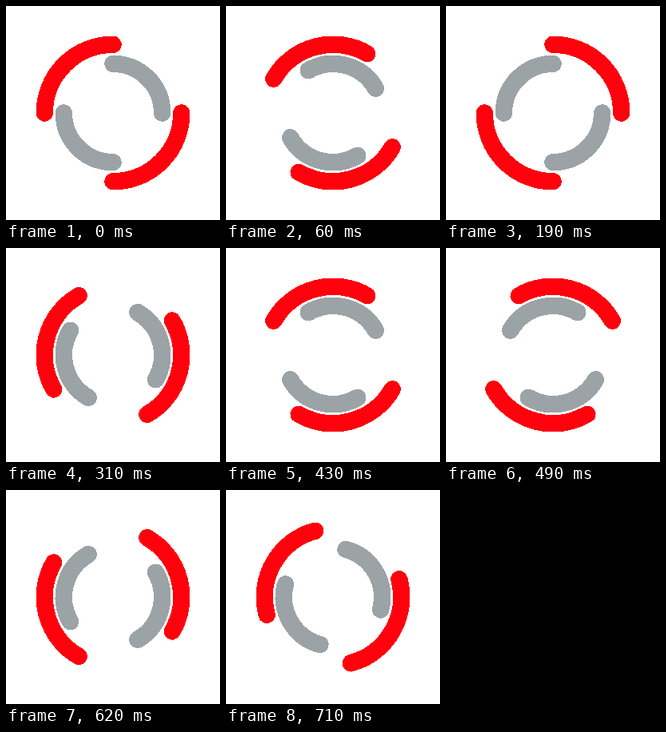
Write an HTML page that moves like this. It is 268x268 px and loops after 0.74 s.

```html
<!DOCTYPE html>
<html lang="en">
<head>
<meta charset="utf-8">
<title>Double ring spinner</title>
<style>
  html, body { margin: 0; width: 100%; height: 100%; overflow: hidden; background: #fff; }
  svg { display: block; width: 100vw; height: 100vh; }
  path { fill: none; stroke-width: 8; stroke-linecap: round; }
</style>
</head>
<body>
<svg viewBox="0 0 100 100">
  <!-- Hard edges: a pixel is either covered or empty. -->
  <filter id="hard" filterUnits="userSpaceOnUse" x="0" y="0" width="100" height="100" color-interpolation-filters="sRGB">
    <feComponentTransfer><feFuncA type="discrete" tableValues="0 1"/></feComponentTransfer>
  </filter>
  <g filter="url(#hard)">
    <path id="outer" stroke="#ff000c" d="M82 50A32 32 0 0 1 50 82M18 50A32 32 0 0 1 50 18"/>
    <path id="inner" stroke="#9ca3a6" d="M50 73A23 23 0 0 1 27 50M50 27A23 23 0 0 1 73 50"/>
  </g>
</svg>
<script>
  const LOOP = 740, STEPS = 24, TURN = 360 / STEPS;
  const outer = document.getElementById('outer');
  const inner = document.getElementById('inner');

  // Steps last 30 ms; the sixth of every twelve lasts 40 ms.
  const stepStart = i => 30 * i + 10 * Math.floor((i + 6) / 12);

  const rotate = (ring, angle) => ring.setAttribute('transform', `rotate(${angle} 50 50)`);

  function draw(time) {
    let step = STEPS - 1;
    while (step > 0 && stepStart(step) > time) step--;
    rotate(outer, step * TURN);
    rotate(inner, -step * TURN);
  }

  const start = performance.now();
  function tick() {
    draw((performance.now() - start) % LOOP);
    requestAnimationFrame(tick);
  }
  tick();
</script>
</body>
</html>
```
